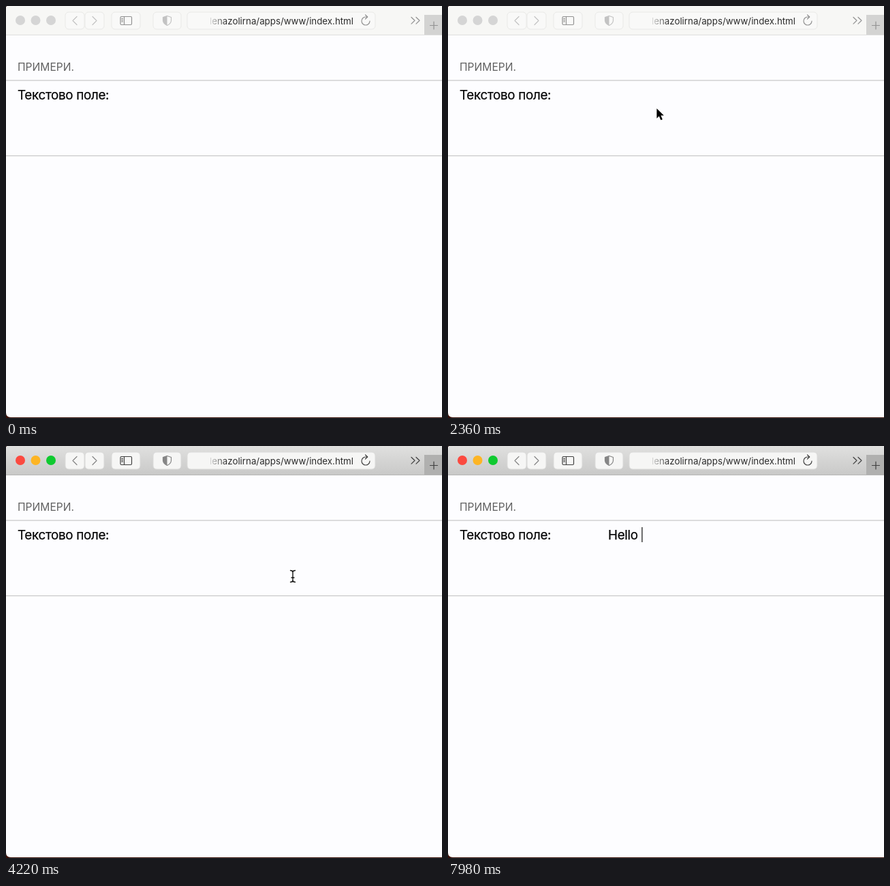
An HTML page that plays this animation: 640 px wide and 604 px high, repeating every 8 s.

```html
<!DOCTYPE html>
<html lang="bg">
<head>
<meta charset="utf-8">
<title>Текстово поле</title>
<style>
  html, body { margin: 0; width: 100%; height: 100%; overflow: hidden; background: #3a1008; }
  svg { display: block; width: 100%; height: 100%; }
  text { font-family: Inter, Roboto, sans-serif; white-space: pre; }
  .field { font-size: 18.8px; letter-spacing: -.3px; fill: #050505; stroke: #050505; stroke-width: .25; }
  .icon { fill: none; stroke: var(--icon); stroke-width: 1.2; stroke-linecap: round; stroke-linejoin: round; }
  .late { stroke: var(--late); }
  .soft { stroke: var(--soft); }
  .btn { fill: var(--btn); stroke: var(--edge); stroke-width: 1; }
</style>
</head>
<body>
<svg id="stage" viewBox="0 0 640 604">
  <defs>
    <linearGradient id="bar" x2="0" y2="1">
      <stop id="barTop" offset="0"/>
      <stop id="barEnd" offset="1"/>
    </linearGradient>
    <linearGradient id="fade" gradientUnits="userSpaceOnUse" x1="296" x2="324" y1="0" y2="0">
      <stop offset="0" stop-color="#000"/>
      <stop offset="1" stop-color="#fff"/>
    </linearGradient>
    <mask id="urlMask" maskUnits="userSpaceOnUse" x="266" y="0" width="276" height="42">
      <rect x="266" width="276" height="42" fill="url(#fade)"/>
    </mask>
    <clipPath id="win"><path d="M0 3Q0 0 3 0H640V603H7Q0 603 0 596Z"/></clipPath>
    <path id="beamShape" d="M-3.5 -8.5Q0 -8.5 0 -6Q0 -8.5 3.5 -8.5M0 -6V6M-3.5 8.5Q0 8.5 0 6Q0 8.5 3.5 8.5M-2 2H2"/>
  </defs>

  <rect width="640" height="604" fill="#3a1008"/>
  <g clip-path="url(#win)">
    <rect width="640" height="604" fill="#fdfdff"/>
    <rect width="640" height="42" fill="url(#bar)"/>
    <rect y="42" width="640" height="1" fill="var(--line)"/>
    <g id="lights"></g>
    <g id="buttons"></g>

    <path class="icon soft" d="M104 15.5L98 21.5L104 27.5M127 15.5L133 21.5L127 27.5"/>
    <path class="icon" d="M169.5 15.5H183Q184.5 15.5 184.5 17V26Q184.5 27.5 183 27.5H169.5Q168 27.5 168 26V17Q168 15.5 169.5 15.5ZM173.5 15.5V27.5M169.8 18.3H171.5M169.8 20.6H171.5M169.8 22.9H171.5"/>
    <path class="icon soft" d="M236.5 14.5L242.5 16.5V21.5Q242 26 236.5 28.5Q231 26 230.5 21.5V16.5Z"/>
    <path d="M236.5 14.5V28.5Q231 26 230.5 21.5V16.5Z" fill="var(--soft)"/>
    <text x="510" y="27" text-anchor="end" font-size="13.3" fill="#2c2c2c" mask="url(#urlMask)">lenazolirna/apps/www/index.html</text>
    <path class="icon late" d="M534 22A6 6 0 1 1 528 16H530.5M527.5 13L530.8 16L527.5 19"/>
    <path class="icon" d="M595 16.5L600 21.3L595 26.1M602 16.5L607 21.3L602 26.1"/>
    <rect x="614" y="13" width="26" height="29" fill="var(--tab)"/>
    <path class="icon late" d="M622.5 28.5H633.5M628 23V34"/>

    <text x="17" y="95" font-size="15.6" fill="#606060">ПРИМЕРИ.</text>
    <rect y="108.5" width="640" height="1.2" fill="#c8c8c8"/>
    <text class="field" x="17" y="136.5">Текстово поле:</text>
    <text class="field" id="typed" x="235" y="136.5"></text>
    <rect id="caret" y="119" width="1.3" height="22" fill="#222"/>
    <rect y="219" width="640" height="1.2" fill="#c8c8c8"/>
  </g>

  <path id="arrow" d="M0 0V14.5L3.4 11.3L6 17.2L8.5 16.1L6 10.4H10.5Z" stroke="#fff" stroke-width="1.5" paint-order="stroke"/>
  <g id="beam" fill="none" stroke-linecap="round">
    <use href="#beamShape" stroke="#fff" stroke-width="2.8"/>
    <use href="#beamShape" stroke="#111" stroke-width="1.4"/>
  </g>
</svg>
<script>
const LOOP = 8000, ACTIVATE = 2520, LATE = 2700, FOCUS = 3060, BLINK = 3380;
const $ = id => document.getElementById(id);
const stage = $('stage'), typed = $('typed'), caret = $('caret');

function add(parent, name, attrs) {
  const node = document.createElementNS('http://www.w3.org/2000/svg', name);
  for (const key in attrs) node.setAttribute(key, attrs[key]);
  return parent.appendChild(node);
}

const lights = [21, 43.5, 66].map(x => add($('lights'), 'circle', { cx: x, cy: 21, r: 7 }));
[[87, 28], [116, 28], [155, 42], [216, 41], [266, 276]].forEach(([x, w]) =>
  add($('buttons'), 'rect', { class: 'btn', x, y: 9, width: w, height: 25, rx: 5 }));

const themes = {
  idle: {
    bar: ['#f7f7f5', '#f7f7f5'], lights: ['#d5d5d5', '#d5d5d5', '#d5d5d5'],
    vars: { icon: '#929292', soft: '#c3c3c3', btn: '#f9f9f8', edge: '#e9e9e7', tab: '#d3d3d2', line: '#dedede' }
  },
  active: {
    bar: ['#e0e0df', '#c9c9c8'], lights: ['#fb4a40', '#fdb524', '#0fca30'],
    vars: { icon: '#404040', soft: '#868686', btn: '#f6f6f5', edge: '#dadad9', tab: '#b0b0af', line: '#b6b6b5' }
  }
};

// Pointer stops: time, x, y
const route = [
  [1480, 470, 606], [1800, 338, 163], [2400, 306, 150], [2660, 308, 155],
  [3060, 290, 135], [3440, 421, 191], [4300, 421, 191], [4800, 520, 620]
];
const keys = [[5900, 'H'], [6140, 'e'], [6400, 'l'], [6760, 'l'], [7060, 'o'], [7600, ' ']];

function pointerAt(t) {
  const i = route.findIndex(stop => stop[0] > t);
  if (i < 1) return null;
  const [a, b] = [route[i - 1], route[i]];
  const u = (t - a[0]) / (b[0] - a[0]), e = u * u * (3 - 2 * u);
  return [a[1] + (b[1] - a[1]) * e, a[2] + (b[2] - a[2]) * e];
}

function place(node, point, shown) {
  node.style.display = point && shown ? '' : 'none';
  if (point) node.setAttribute('transform', `translate(${point[0].toFixed(2)} ${point[1].toFixed(2)})`);
}

function render(t) {
  const active = t >= ACTIVATE;
  const theme = active ? themes.active : themes.idle;
  for (const key in theme.vars) stage.style.setProperty('--' + key, theme.vars[key]);
  stage.style.setProperty('--late', active && t < LATE ? '#a6a6a6' : theme.vars.icon);
  $('barTop').setAttribute('stop-color', theme.bar[0]);
  $('barEnd').setAttribute('stop-color', theme.bar[1]);
  lights.forEach((dot, i) => dot.setAttribute('fill', theme.lights[i]));

  const point = pointerAt(t);
  place($('arrow'), point, !active);
  place($('beam'), point, active);

  const text = keys.filter(key => t >= key[0]).map(key => key[1]).join('');
  if (typed.textContent !== text) typed.textContent = text;
  const blinkOn = t < BLINK || (t - BLINK) % 1000 < 500;
  caret.style.display = t >= FOCUS && (text || blinkOn) ? '' : 'none';
  caret.setAttribute('x', 235.5 + (text ? typed.getComputedTextLength() : 0));
}

const start = performance.now();
function tick() {
  render((performance.now() - start) % LOOP);
  requestAnimationFrame(tick);
}
render(0);
requestAnimationFrame(tick);
</script>
</body>
</html>
```
